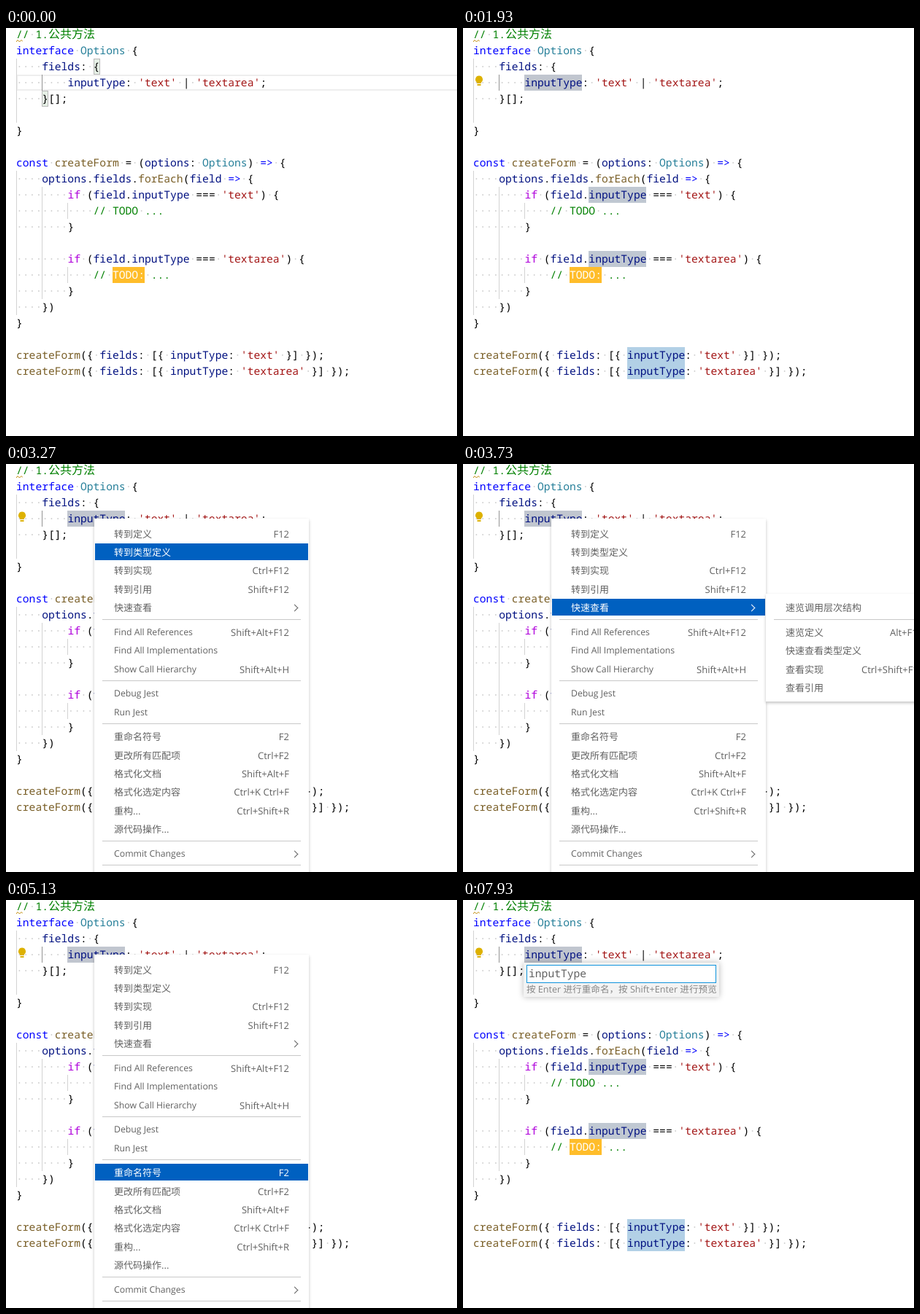
Recreate the animation shown at these times as an HTML page. Size 618 px wide and 560 px high, loop 8 s.

```html
<!DOCTYPE html>
<html lang="zh-CN">
<head>
<meta charset="utf-8">
<title>Rename symbol</title>
<style>
html, body { margin: 0; width: 100%; height: 100%; overflow: hidden; background: #fff; }
#stage {
  position: relative; width: 618px; height: 560px; overflow: hidden; background: #fff;
  text-rendering: geometricPrecision; white-space: pre;
}
#stage div { position: absolute; box-sizing: border-box; }
.line, .field { font: 14.66px/22px "Noto Sans Mono", "Noto Sans CJK SC", monospace; color: #000; }
.line { left: 14px; height: 22px; }
.line i { font-style: normal; color: #cfcfcf; }
.line b { font-weight: 400; font-size: 16px; line-height: 0; }
.key { color: #00f; } .ctl { color: #af00db; } .type { color: #267f99; }
.fn { color: #795e26; } .var { color: #001080; } .str { color: #a31515; }
.com { color: #008000; } .todo { color: #fff; }
.guide { width: 1px; background: #d3d3d3; }
.bracket { width: 9px; height: 22px; border: 1px solid #b9b9b9; background: #e6f0e6; }
.word { width: 79px; height: 22px; }
.sel { background: var(--sel); } .read { background: var(--read); } .write { background: var(--write); }
.menu {
  background: #fff; box-shadow: 0 2px 4px rgba(0, 0, 0, .24);
  font: 13px/24px "Open Sans", "Noto Sans CJK SC", sans-serif; color: #616161;
}
.item { left: 1px; right: 1px; height: 23px; }
.item.on { background: #0060c0; color: #fff; }
.label { left: 26px; top: 0; }
.latin { font-size: 12.25px; }
.hint { right: 26px; top: 0; }
.arrow {
  right: 15px; top: 9px; width: 7px; height: 7px; transform: rotate(45deg);
  border: solid currentColor; border-width: 1px 1px 0 0;
}
.rule { left: 11px; right: 11px; height: 1px; background: #c8c8c8; }
#rename { left: 83px; top: 86px; width: 268px; height: 47px; background: #f3f3f3; box-shadow: 0 0 8px rgba(0, 0, 0, .28); }
.field { left: 4px; top: 3px; width: 260px; height: 25px; background: #fff; border: 1px solid #0e93dc; color: #616161; }
.field div { left: 2px; top: 2px; height: 19px; line-height: 19px; }
#marked { background: #3390ff; color: #fff; }
#tip { left: 4px; top: 28px; font: 12.6px/18px "Open Sans", "Noto Sans CJK SC", sans-serif; color: #858585; }
</style>
</head>
<body>
<div id="stage"></div>
<script>
const LOOP = 8000, ROW = 22, COL = 8.797, LEFT = 14;
const stage = document.getElementById('stage');
const shown = [];

function box(cls, style = {}, parent = stage, html = '') {
  const el = document.createElement('div');
  el.className = cls;
  for (const k in style) el.style[k] = typeof style[k] === 'number' ? style[k] + 'px' : style[k];
  el.innerHTML = html;
  return parent.appendChild(el);
}
const colX = col => Math.round(LEFT + col * COL);
const rowY = row => row * ROW - 2;
const during = (el, from, to = LOOP) => { shown.push([el, from, to]); return el; };

// Code text
const code = `// 1.公共方法
interface Options {
    fields: {
        inputType: 'text' | 'textarea';
    }[];

}

const createForm = (options: Options) => {
    options.fields.forEach(field => {
        if (field.inputType === 'text') {
            // TODO ...
        }

        if (field.inputType === 'textarea') {
            // TODO: ...
        }
    })
}

createForm({ fields: [{ inputType: 'text' }] });
createForm({ fields: [{ inputType: 'textarea' }] });`;

const kinds = ['com', 'str', 'key', 'ctl', 'type', 'fn', 'var', ''];
const tokens = /(\/\/.*)|('[^']*')|(\binterface\b|\bconst\b|=>)|(\bif\b)|(\bOptions\b)|(\bcreateForm\b|\bforEach\b)|(\w+)|( +)/g;

function paint(line) {
  return line.replace(tokens, (text, ...groups) => {
    const kind = kinds[groups.findIndex((g, i) => i < kinds.length && g !== undefined)];
    const body = text.replace(/ /g, '<i>·</i>')
      .replace('TODO:', '<span class="todo">$&</span>')
      .replace(/[\u4e00-\u9fff]+/, '<b>$&</b>');
    return `<span class="${kind}">${body}</span>`;
  });
}

// Editor decorations lie beneath the text
const lineFrame = box('', { left: LEFT, top: 64, width: 620, height: 22, border: '2px solid #eee' });
during(lineFrame, 0, 1000);

[[8, 3, 'sel'], [18, 10, 'read'], [18, 14, 'read'], [24, 20, 'write'], [24, 21, 'write']]
  .forEach(([col, row, kind]) => box('word ' + kind, { left: colX(col), top: rowY(row) }));
box('', { left: 146, top: rowY(15), width: 44, height: ROW, background: '#ffbd2a' });

[[0, 2, 6], [0, 9, 18], [4, 10, 17], [8, 11, 12], [8, 15, 16]].forEach(([col, from, to]) =>
  box('guide', { left: colX(col), top: rowY(from), height: (to - from) * ROW }));
box('guide', { left: 49, top: 64, height: ROW, background: '#939393' });

during(box('bracket', { left: colX(12), top: rowY(2) }), 0, 930);
during(box('bracket', { left: colX(4), top: rowY(4) }), 0, 930);

code.split('\n').forEach((line, row) => box('line', { top: rowY(row) }, stage, paint(line)));

box('', { left: 14, top: 15 }, stage,
  '<svg width="9" height="5" style="display:block"><path d="M0 4L2 1.5L4.5 4L7 1.5L9 3.5" fill="none" stroke="#bf8803"/></svg>');
during(box('', { left: 162, top: 64, width: 2, height: ROW, background: '#000' }), 1000, 1600);
during(box('', { left: 15, top: 65 }, stage,
  '<svg width="14" height="17" style="display:block"><path d="M7 .5a5 5 0 0 1 3 9V11H4v-1.500a5 5 0 0 1 3-9zM4.500 12h5v2h-5z" fill="#ddb100"/></svg>'), 1400);

// Menus: [centre y, label, shortcut]; a bare number is a separator
function menu(left, top, width, height, rows, addHint) {
  const root = box('menu', { left, top, width, height });
  const items = [];
  rows.forEach(row => {
    if (typeof row === 'number') return box('rule', { top: row - top }, root);
    const [y, label, hint] = row;
    const item = box('item', { top: y - 12 - top }, root);
    box(/^[ -~]+$/.test(label) ? 'label latin' : 'label', {}, item, label);
    if (hint === '>') box('arrow', {}, item);
    else if (hint) addHint(item, hint);
    items.push(item);
  });
  return { root, items };
}

const main = menu(121, 75, 294, 500, [
  [96, '转到定义', 'F12'], [121, '转到类型定义'], [146, '转到实现', 'Ctrl+F12'],
  [172, '转到引用', 'Shift+F12'], [197, '快速查看', '>'], 213,
  [231, 'Find All References', 'Shift+Alt+F12'], [256, 'Find All Implementations'],
  [282, 'Show Call Hierarchy', 'Shift+Alt+H'], 297,
  [315, 'Debug Jest'], [341, 'Run Jest'], 356,
  [374, '重命名符号', 'F2'], [400, '更改所有匹配项', 'Ctrl+F2'], [425, '格式化文档', 'Shift+Alt+F'],
  [450, '格式化选定内容', 'Ctrl+K Ctrl+F'], [476, '重构...', 'Ctrl+Shift+R'], [501, '源代码操作...'], 517,
  [535, 'Commit Changes', '>'], 550
], (item, hint) => box('hint', {}, item, hint));
during(main.root, 2070, 5730);

const peek = menu(415, 178, 250, 148, [
  [197, '速览调用层次结构'], 213, [231, '速览定义', 'Alt+F12'], [256, '快速查看类型定义'],
  [282, '查看实现', 'Ctrl+Shift+F12'], [307, '查看引用']
], (item, hint) => box('', { left: hint.length > 8 ? 130 : 169, top: 0 }, item, hint));
during(peek.root, 3730, 5130);

// Rename popup
const rename = during(box('', {}), 5800);
rename.id = 'rename';
const field = box('field', {}, rename);
box('', {}, field, 'inputType');
const marked = during(box('', {}, field, 'inputType'), 5800, 7400);
marked.id = 'marked';
during(box('', { width: 1, background: '#000' }, field), 7400, 7930);
box('', {}, rename, '按 Enter 进行重命名，按 Shift+Enter 进行预览').id = 'tip';

// Stepped states: [start time, value...]
const hover = [[0, -1], [2070, 0], [2470, 1], [2530, 2], [2800, 1], [2870, 0], [3270, 1], [3330, 2],
  [3400, 3], [3470, 4], [4400, 6], [4470, 7], [4730, 9], [5000, -1], [5070, 10]];
const tint = [[0, 'none', 'none', 'none'], [1000, '#add6ff', 'none', 'none'],
  [1200, '#add6ff', '#d6ebff', '#d6ebff'], [1400, '#98b6d5', '#b6c6d5', '#a4c9e6'],
  [1930, '#c1c6cf', '#c0c8d2', '#b2d0e6']];
const at = (steps, t) => steps.filter(s => s[0] <= t).pop();

function draw() {
  const t = performance.now() % LOOP;
  shown.forEach(([el, from, to]) => { el.style.display = t >= from && t < to ? '' : 'none'; });
  const active = at(hover, t)[1];
  main.items.forEach((item, i) => item.classList.toggle('on', i === active));
  const [, ...colors] = at(tint, t);
  ['--sel', '--read', '--write'].forEach((name, i) => stage.style.setProperty(name, colors[i]));
  requestAnimationFrame(draw);
}
draw();
</script>
</body>
</html>
```
